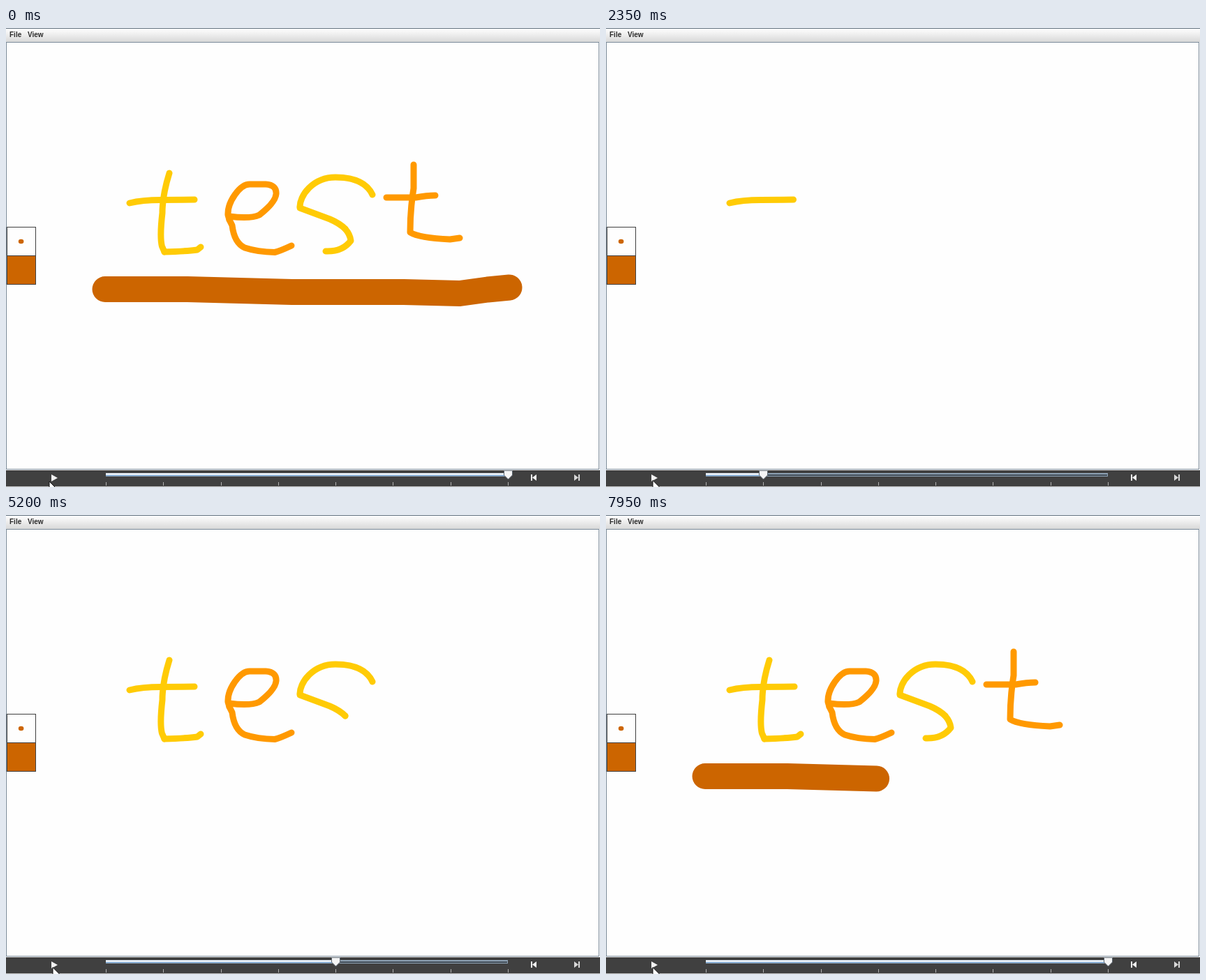
Write an HTML page with a canvas that moves like this. It is 851 px wide and 658 px high and loops after 8 s.

```html
<!DOCTYPE html>
<html lang="en">
<head>
<meta charset="utf-8">
<title>Sketch playback</title>
<style>
html, body { margin: 0; width: 100%; height: 100%; overflow: hidden; background: #fefefe; }
canvas, svg { position: absolute; left: 0; top: 0; display: block; }
path { fill: none; stroke-width: 9; stroke-linecap: round; stroke-linejoin: round; }
.yellow { stroke: #ffcb05; }
.orange { stroke: #ff9900; }
.brown { stroke: #cc6500; stroke-width: 37; }
</style>
</head>
<body>
<canvas id="stage" width="851" height="658"></canvas>
<!-- One path per pen movement; data-from and data-to are its times in ms -->
<svg width="851" height="658">
  <path class="yellow" data-from="1500" data-to="2420" d="M177 251 Q195 246.5 222 246.5 L270 246"/>
  <path class="yellow" data-from="2690" data-to="2920" d="M234 208 Q224 240 224 265 Q220 300 223.5 313 L227 321"/>
  <path class="yellow" data-from="3150" data-to="3400" d="M227 321 Q260 320 274 318 L279 314"/>
  <path class="orange" data-from="3580" data-to="4050" d="M320 270 Q350 274 363 268 Q386 250 387 238 Q388 225 372 224 H350 C335 223 317 250 318 268 L320 275"/>
  <path class="orange" data-from="4150" data-to="4400" d="M320 275 L324 283 Q327 308 342 315 Q360 321 385 321.5 Q392 320 409 312"/>
  <path class="yellow" data-from="4580" data-to="5190" d="M525 239 Q513 214 472 214 C440 214 420 240 421 258 L464 274 Q478 280 486 288"/>
  <path class="yellow" data-from="5200" data-to="5450" d="M486 288 Q493 296 494 305 Q482 321 458 320"/>
  <path class="orange" data-from="5800" data-to="6190" d="M545 243 H587 Q603 240 615 240"/>
  <path class="orange" data-from="6600" data-to="7225" d="M584 196 V230 Q579 260 579 293 Q592 301 636 303 L650 301"/>
  <path class="brown" data-from="7630" data-to="8345" d="M142 374.5 H260 L410 378.5 H570 L650 380.5 L690 375 L721 372"/>
</svg>
<script>
const ctx = document.getElementById('stage').getContext('2d');
const strokes = [...document.querySelectorAll('path')];
strokes.forEach(s => s.setAttribute('pathLength', 1));

const LOOP = 8000, CLEAR = 550;
const STEPS = 7, STEP_MS = 1020, PLAY = 530;
const TRACK_X = 143, TRACK_W = 576;
const BROWN = '#cc6500';

const clamp = x => Math.max(0, Math.min(1, x));
const ease = x => x * x * (3 - 2 * x);

function drawStroke(s, t) {
  const { from, to } = s.dataset;
  const p = t < CLEAR ? 1 : ease(clamp((t - from) / (to - from)));
  s.style.visibility = p > 0 ? 'visible' : 'hidden';
  s.style.strokeDasharray = p < 1 ? `${p} 2` : 'none';
}

function rect(color, x, y, w, h) {
  ctx.fillStyle = color;
  ctx.fillRect(x, y, w, h);
}

function frame(color, x, y, w, h) {
  ctx.strokeStyle = color;
  ctx.strokeRect(x + 0.5, y + 0.5, w, h);
}

function poly(x, y, fill, d, outline) {
  const shape = new Path2D(d);
  ctx.save();
  ctx.translate(x, y);
  ctx.fillStyle = fill;
  ctx.fill(shape);
  if (outline) {
    ctx.strokeStyle = outline;
    ctx.stroke(shape);
  }
  ctx.restore();
}

function drawMenu() {
  const shade = ctx.createLinearGradient(0, 1, 0, 19);
  shade.addColorStop(0, '#ffffff');
  shade.addColorStop(1, '#dadada');
  rect(shade, 0, 0, 851, 20);
  rect('#5f6f7d', 0, 0, 851, 1);
  ctx.fillStyle = '#2b2b2b';
  ctx.font = 'bold 10px "Liberation Sans", Arial, sans-serif';
  ctx.fillText('File', 5, 13);
  ctx.fillText('View', 31, 13);
}

function drawPalette() {
  rect(BROWN, 1, 326, 41, 41);
  frame('#404040', 1, 285, 41, 41);
  frame('#404040', 1, 326, 41, 41);
  ctx.fillStyle = BROWN;
  ctx.beginPath();
  ctx.ellipse(21.6, 306, 3.8, 3.3, 0, 0, 7);
  ctx.fill();
}

function drawPlayer(step) {
  const tickX = k => Math.round(TRACK_X + k * TRACK_W / STEPS);
  const done = tickX(step) - TRACK_X;
  rect('#404040', 0, 634, 851, 23);
  rect('#c4c4c4', 0, 657, 851, 1);

  rect('#8fa3b5', TRACK_X, 638, TRACK_W, 5);
  rect('#404a54', TRACK_X + 1, 640, TRACK_W - 2, 2);
  rect('#e6eef6', TRACK_X, 638, done, 3);
  rect('#6f9fd2', TRACK_X, 641, done, 1);
  for (let k = 0; k <= STEPS; k++) rect('#b0b0b0', tickX(k), 651, 1, 5);
  poly(tickX(step), 634, '#f5f5f5', 'M-5.5 .5h12v6.5l-6 6l-6 -6z', '#5c6670');

  poly(65, 640, '#f2f2f2', 'M0 0l9 5l-9 5z');
  poly(752, 640, '#f2f2f2', 'M0 0h2v9h-2z M8 0v9l-6 -4.5z');
  poly(814, 640, '#d8d8d8', 'M0 0l6 4.5l-6 4.5z M6 0h2v9h-2z');
}

function drawCursor(t) {
  const k = clamp((t - 25) / 225);
  poly(62 + 5 * k, 650 - 1.5 * k, '#ffffff', 'M0 0v17l4 -3.5l3 6.5l2 -1l-2.5 -6.5l5.5 -.5z', '#111111');
}

function draw(t) {
  const step = t < CLEAR ? STEPS : Math.floor((t - PLAY) / STEP_MS);
  rect('#fefefe', 0, 0, 851, 658);
  drawMenu();
  frame('#7a8a99', 0, 20, 849, 612);
  drawPalette();
  drawPlayer(Math.min(STEPS, step));
  drawCursor(t);
  strokes.forEach(s => drawStroke(s, t));
}

const start = performance.now();
function tick() {
  draw((performance.now() - start) % LOOP);
  requestAnimationFrame(tick);
}
tick();
</script>
</body>
</html>
```
